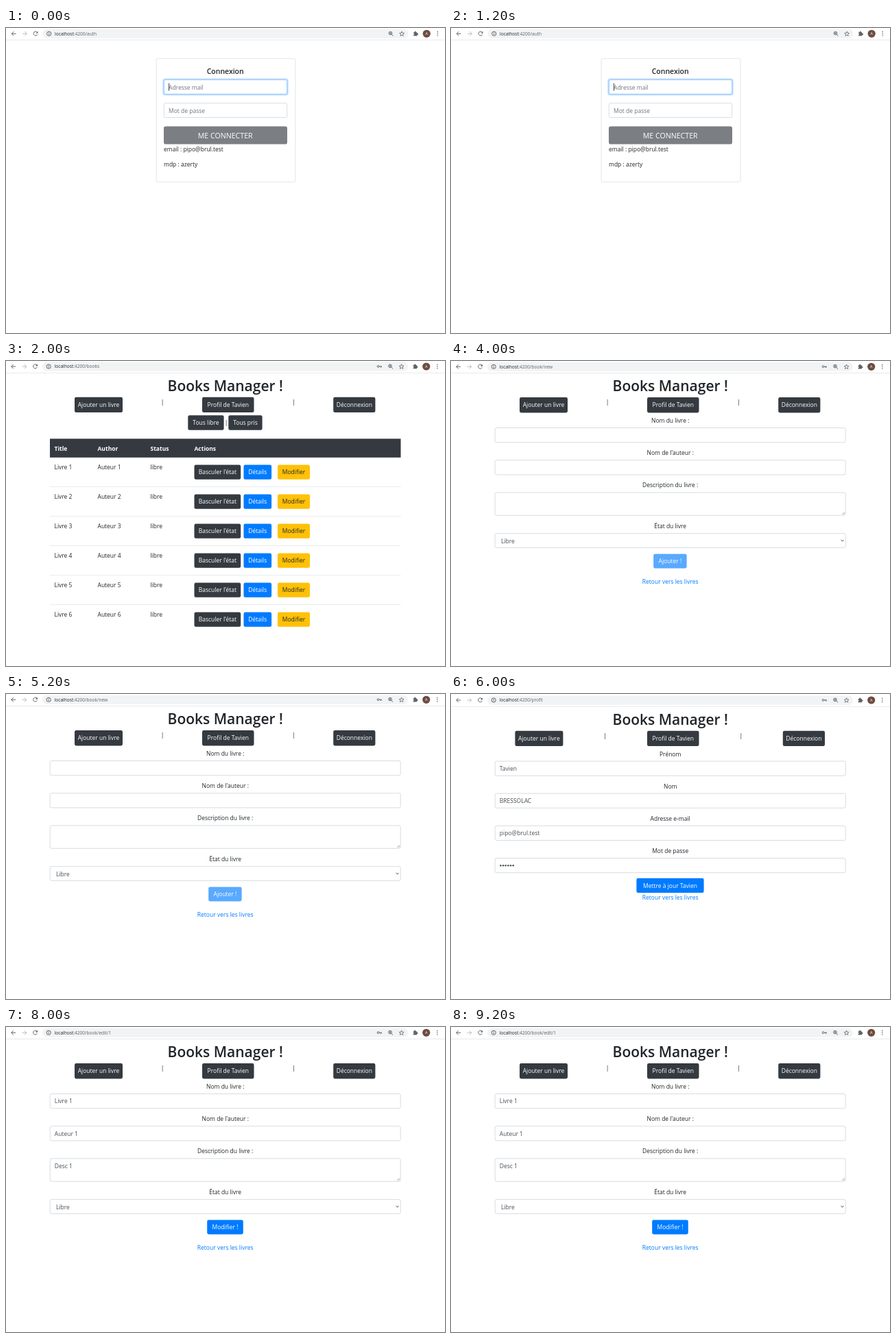
These frames come from a looping animation (640 by 445 pixels, 10 s). An HTML page:

```html
<!DOCTYPE html>
<html lang="fr">
<head>
<meta charset="utf-8">
<title>Gestion de livres</title>
<style>
  html, body { margin: 0; width: 100%; height: 100%; overflow: hidden; background: #fff; }
  svg { display: block; width: 100%; height: 100%; }
  text { font: 8.5px "Open Sans", "Noto Sans", sans-serif; fill: #212529; white-space: pre; }
  .mid { text-anchor: middle; }
  .title { font-size: 21px; font-weight: 600; }
  .heading { font-size: 10.5px; font-weight: 600; }
  .large { font-size: 10.6px; }
  .bold { font-weight: 700; }
  .white { fill: #fff; }
  .value { fill: #495057; }
  .hint { fill: #6c757d; }
  .link { fill: #007bff; }
  .url { font-size: 6.6px; }
  .url .path { fill: #5f6368; }
  .avatar { font-size: 5.5px; fill: #fff; }
  .icon { fill: none; stroke: #5f6368; stroke-width: 1; }
  .solid { fill: #5f6368; }
  .page { visibility: hidden; animation: show 10s step-end infinite; }
  @keyframes show { 0% { visibility: visible; } 20%, 100% { visibility: hidden; } }
</style>
</head>
<body>
<svg id="stage" viewBox="0 0 640 445" xmlns="http://www.w3.org/2000/svg"></svg>
<script>
const DARK = '#343a40', BLUE = '#007bff', YELLOW = '#ffc107';
const MIDDLE = 319.7;
const USER = 'Tavien', MAIL = 'pipo@brul.test';

const text = (x, y, s, cls = '') => `<text x="${x}" y="${y}" class="${cls}">${s}</text>`;
const centered = (y, s, cls = '') => text(MIDDLE, y, s, 'mid ' + cls);
const rect = (x, y, w, h, fill, r = 0, extra = '') =>
  `<rect x="${x}" y="${y}" width="${w}" height="${h}" rx="${r}" fill="${fill}" ${extra}/>`;
const outline = (x, y, w, h, color = '#ced4da') =>
  rect(x, y, w, h, '#fff', 2.3, `stroke="${color}" stroke-width=".8"`);
const path = (d, cls = 'icon', extra = '') => `<path d="${d}" class="${cls}" ${extra}/>`;
const circle = (x, y, r, cls = 'icon') => `<circle cx="${x}" cy="${y}" r="${r}" class="${cls}"/>`;
const button = (x, y, w, h, s, fill = DARK, cls = 'white') =>
  rect(x, y, w, h, fill, 2.3) + text(x + w / 2, y + h / 2 + 3.1, s, 'mid ' + cls);

function starPath(cx, cy, r) {
  const points = Array.from({ length: 10 }, (_, i) => {
    const a = i * Math.PI / 5 - Math.PI / 2, d = i % 2 ? r * .45 : r;
    return `${(cx + d * Math.cos(a)).toFixed(2)} ${(cy + d * Math.sin(a)).toFixed(2)}`;
  });
  return `M${points.join('L')}Z`;
}

function toolbar(route, dx, dy, key) {
  return `<g transform="translate(${dx} ${dy})">`
    + rect(53, 1.8, 533, 13.2, '#f1f3f4', 6.6)
    + path('M14 8.3H7.8M10.8 5.2 7.7 8.3l3.1 3.1')
    + path('M23.5 8.3h6.2M26.7 5.2l3.1 3.1-3.1 3.1', 'icon', 'opacity=".4"')
    + path('M45 6.2A3 3 0 1 0 45.4 9.4') + path('M46 4.8v3h-3z', 'solid')
    + circle(62.2, 8.3, 3.1, 'icon') + path('M62.2 7.8v2.2M62.2 6.3v.9')
    + `<text x="70.6" y="10.7" class="url">localhost<tspan class="path">:4200/${route}</tspan></text>`
    + (key ? circle(542.6, 8.2, 1.4) + path('M544 8.2h4M546.7 8.2v1.8') : '')
    + circle(560, 7.6, 2.3) + path('M561.7 9.3l2.3 2.3M558.8 7.6h2.4M560 6.4v2.4', 'icon', 'stroke-width=".8"')
    + path(starPath(576.6, 8.6, 3.6), 'icon', 'style="stroke-width:.8"')
    + rect(593.6, 6.3, 5.4, 5.2, '#5f6368', .6) + circle(596.3, 5.9, 1.2, 'solid')
    + circle(599.3, 8.9, 1.2, 'solid') + circle(593.7, 8.9, .9, 'white')
    + '<circle cx="612.7" cy="8.3" r="5.6" fill="#6d4c41"/>' + text(612.7, 10.3, 'A', 'mid avatar')
    + [5.6, 8.3, 11].map(y => circle(628.7, y, .8, 'solid')).join('')
    + rect(-1, 17.2, 642, .8, '#e3e4e6') + '</g>';
}

// Side items sit a little further out when spread is positive.
function header(dy, spread = 0) {
  return `<g transform="translate(0 ${dy})">`
    + centered(43.6, 'Books Manager !', 'title')
    + button(100 - spread, 52.7, 70, 22.3, 'Ajouter un livre')
    + button(286, 52.7, 75.5, 22.3, 'Profil de ' + USER)
    + button(477.2 + spread, 52.7, 61.2, 22.3, 'Déconnexion')
    + text(228 - spread / 2, 63, '|', 'mid') + text(419.5 + spread / 2, 63, '|', 'mid') + '</g>';
}

const field = (y, label, value = '', h = 21.2) =>
  centered(y, label) + outline(64.2, y + 7.5, 511, h) + text(70.8, y + 21.4, value, 'value');

function login() {
  return outline(219.1, 44.6, 202.8, 180.2, '#dfdfdf')
    + centered(66.8, 'Connexion', 'heading')
    + rect(228.3, 73.6, 183.4, 24.8, '#bfdeff', 4)
    + outline(230.3, 75.6, 179.4, 20.8, '#80bdff')
    + text(237, 89.6, 'Adresse mail', 'hint') + rect(237, 80.5, .8, 11.2, '#222')
    + outline(230.3, 109.7, 179.4, 20.9)
    + text(237, 123.6, 'Mot de passe', 'hint')
    + rect(230, 143.5, 180, 26, '#7b7f83', 2.8) + centered(160.7, 'ME CONNECTER', 'white large')
    + text(230, 179.5, 'email : ' + MAIL) + text(230, 201.5, 'mdp : azerty');
}

function bookRow(_, i) {
  const y = 43 * i;
  return (i ? rect(64, 140.2 + y, 511.5, .7, '#dee2e6') : '')
    + text(70.5, 157.6 + y, `Livre ${i + 1}`) + text(133.5, 157.6 + y, `Auteur ${i + 1}`)
    + text(210.5, 157.6 + y, 'libre')
    + button(274.5, 151.5 + y, 67.7, 21.2, "Basculer l'état")
    + button(346.5, 151.5 + y, 40.6, 21.2, 'Détails', BLUE)
    + button(396, 151.5 + y, 47, 21.2, 'Modifier', YELLOW, '');
}

function books() {
  const columns = [[70.5, 'Title'], [133.5, 'Author'], [210.5, 'Status'], [274.5, 'Actions']];
  return header(0)
    + button(265.3, 79.3, 52.3, 21.4, 'Tous libre') + text(321, 92.6, '|', 'mid')
    + button(324.3, 79.3, 49.3, 21.4, 'Tous pris')
    + rect(64, 113.4, 511.5, 27.4, DARK)
    + columns.map(([x, s]) => text(x, 130.7, s, 'bold white')).join('')
    + Array.from({ length: 6 }, bookRow).join('');
}

function bookForm(name, author, desc, action) {
  return header(.4)
    + field(90, 'Nom du livre :', name)
    + field(137.2, "Nom de l'auteur :", author)
    + field(184.4, 'Description du livre :', desc, 33.4)
    + path('M570.3 224l3.5-3.5M572.5 224l1.5-1.5', 'icon', 'style="stroke-width:.6"')
    + centered(244, 'État du livre') + outline(64.2, 251.6, 511, 20.8)
    + text(73, 265.6, 'Libre', 'value')
    + path('M568.6 261l1.9 1.9 1.9-1.9', 'icon', 'style="stroke:#343a40"')
    + action + centered(324.7, 'Retour vers les livres', 'link');
}

function profile() {
  const dots = Array.from({ length: 6 }, (_, i) => circle(72.4 + 3.65 * i, 250.3, 1.25, 'value'));
  return header(1, 6.6)
    + field(90.5, 'Prénom', USER)
    + field(137.6, 'Nom', 'BRESSOLAC')
    + field(184.8, 'Adresse e-mail', MAIL)
    + field(232, 'Mot de passe') + dots.join('')
    + button(270.4, 268.8, 98.2, 21.2, 'Mettre à jour ' + USER, BLUE)
    + centered(299.6, 'Retour vers les livres', 'link');
}

const pages = [
  toolbar('auth', .5, 0, false) + login(),
  toolbar('books', 0, -.3, true) + books(),
  toolbar('book/new', 0, 0, true)
    + bookForm('', '', '', button(295.2, 281.4, 48.4, 21, 'Ajouter !', '#59a9ff')),
  toolbar('profil', 0, .7, true) + profile(),
  toolbar('book/edit/1', 0, 0, true)
    + bookForm('Livre 1', 'Auteur 1', 'Desc 1', button(293.2, 281.4, 52.6, 21, 'Modifier !', BLUE))
];

document.getElementById('stage').innerHTML = pages.map((content, i) =>
  `<g class="page" style="animation-delay:${i ? i * 2 - 10 : 0}s">${content}</g>`).join('');
</script>
</body>
</html>
```
